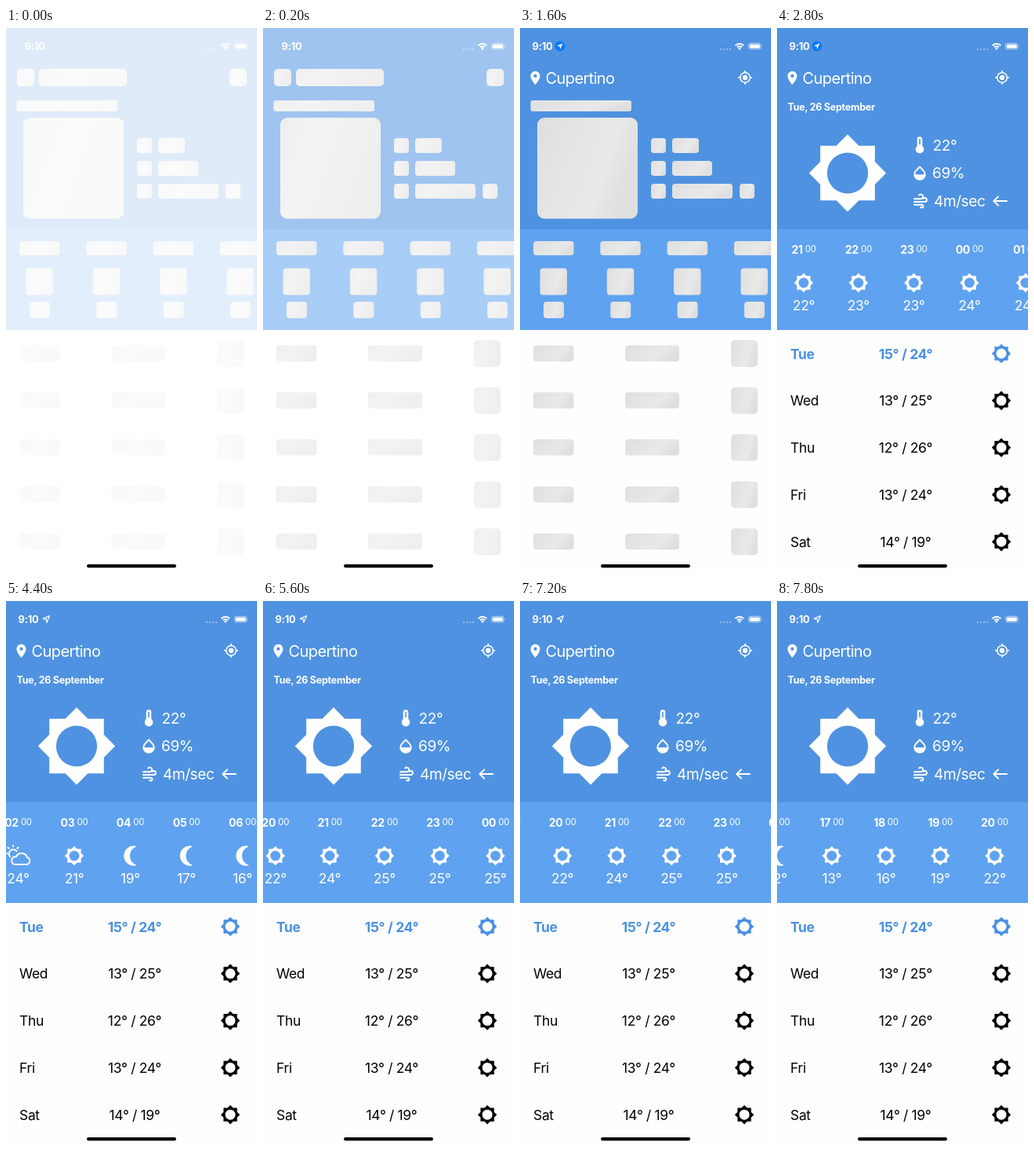
These frames come from a looping animation (320x693 px, 8000 ms). An HTML page:

```html
<!DOCTYPE html>
<html lang="en">
<head>
<meta charset="utf-8">
<title>Weather</title>
<style>
  html, body { margin: 0; width: 100%; height: 100%; overflow: hidden; background: #fff; }
  svg { display: block; width: 100%; height: 100%; }
  text { font-family: Inter, Roboto, sans-serif; letter-spacing: -.02em; white-space: pre; }
  .b { font-weight: 700; }
  .m { text-anchor: middle; }
  .line { fill: none; stroke: #fff; stroke-width: 2; stroke-linecap: round; stroke-linejoin: round; }
</style>
</head>
<body>
<svg viewBox="0 0 320 693" preserveAspectRatio="none">
  <defs>
    <linearGradient id="shine" x1="0" y1="0" x2="1" y2=".35">
      <stop offset="0" stop-color="#dfdfdf"/>
      <stop id="glow" offset=".5" stop-color="#e9e9e9"/>
      <stop offset="1" stop-color="#dfdfdf"/>
    </linearGradient>
    <path id="sun" fill-rule="evenodd" d="M8-3.31V-8H3.31L0-11.31-3.31-8H-8v4.69L-11.31 0-8 3.31V8h4.69L0 11.31 3.31 8H8V3.31L11.31 0zM0 6A6 6 0 1 1 0-6A6 6 0 1 1 0 6z"/>
    <path id="moon" transform="scale(1.27)" d="M-6.5 0A10 10 0 0 0 6.5 9.54A10 10 0 0 1-.5 0A10 10 0 0 1 6.5-9.54A10 10 0 0 0-6.5 0z"/>
    <path id="cloud" class="line" d="M-5 11H10.500A4.600 4.600 0 0 0 11.500 2A7.500 7.500 0 0 0-2.500 1A5.200 5.200 0 0 0-5 11z"/>
    <g id="cloudSun">
      <path class="line" d="M-10.500 1A5 5 0 1 1-2-6"/>
      <path class="line" d="M-6.500-12v-1M-12-9.500l-1-1M-14-3h-1M-1-9.500l1-1"/>
      <use href="#cloud"/>
    </g>
    <g id="cloudMoon">
      <path d="M-9-13A9 9 0 0 0-12.500 3Q-11 0-7-1Q-5-4-1.500-5Q-10-5-9-13z"/>
      <use href="#cloud"/>
    </g>
  </defs>

  <rect width="320" height="693" fill="#fefefe"/>
  <rect width="320" height="256" fill="#4f92e1"/>
  <rect y="256" width="320" height="128" fill="#5fa2f0"/>

  <g fill="#fff">
    <text id="clock" class="b" y="28" font-size="13">9:10</text>
    <g id="locating">
      <circle cx="51" cy="23" r="6.500" fill="#087bf5"/>
      <path d="M54.500 19.500L47 22.800l3.700.6.500 3.600z"/>
    </g>
    <path id="located" class="line" style="stroke-width:1.200" d="M55.500 18.800L47.200 22.600l4.200.5.500 4.400z"/>
    <g opacity=".5">
      <circle cx="256" cy="27" r="1"/><circle cx="260" cy="27" r="1"/>
      <circle cx="264" cy="27" r="1"/><circle cx="268" cy="27" r="1"/>
    </g>
    <g class="line" style="stroke-linecap:butt">
      <path d="M274.500 22.300a7.300 7.300 0 0 1 10.800 0M276.900 24.500a4.200 4.200 0 0 1 6 0"/>
    </g>
    <path d="M279.900 28l-2-2.100a2.800 2.800 0 0 1 4 0z"/>
    <rect x="291.500" y="19.500" width="15.500" height="7.500" rx="2.300" fill="none" stroke="#fff" stroke-opacity=".55"/>
    <rect x="292.700" y="20.700" width="13.100" height="5.100" rx="1.300"/>
    <path d="M308.200 21.800q1.500 1.400 0 2.900z" opacity=".6"/>
  </g>

  <g id="title" fill="#fff">
    <path transform="translate(19.500 63.500) scale(.86)" fill-rule="evenodd" d="M0-10C-3.870-10-7-6.870-7-3C-7 2.250 0 10 0 10S7 2.250 7-3C7-6.870 3.870-10 0-10zM0-.5A2.500 2.500 0 1 1 0-5.500A2.500 2.500 0 1 1 0-.5z"/>
    <text x="32.500" y="70.500" font-size="20" style="letter-spacing:-.03em">Cupertino</text>
    <circle cx="287" cy="63" r="3.200"/>
    <circle class="line" cx="287" cy="63" r="6.300" style="stroke-width:1.600"/>
    <path class="line" style="stroke-width:1.600;stroke-linecap:butt" d="M287 54v3M287 69v3M278 63h3M293 63h3"/>
  </g>
  <g id="titleBones" fill="url(#shine)"></g>
  <g id="bones" fill="url(#shine)"></g>

  <g id="content">
    <g fill="#fff">
      <text class="b" x="13.500" y="105" font-size="12.500">Tue, 26 September</text>
      <use href="#sun" transform="translate(90 184.500) scale(4.350)"/>
      <path d="M178.700 150V141.500a3.300 3.300 0 0 1 6.600 0V150a5.300 5.300 0 1 1-6.600 0z"/>
      <path d="M182 141.500v6" stroke="#4f92e1" stroke-width="1.600" stroke-linecap="round"/>
      <path class="line" d="M182 176.500l-4.700 4.900a6.700 6.700 0 1 0 9.400 0z"/>
      <path d="M175.500 186.200h13a6.500 6.500 0 0 1-13 0z"/>
      <path class="line" d="M175 217.200h8.300a2.800 2.800 0 1 0-2-4.700M175 221h13.500a2.500 2.500 0 1 0-1.800-4.300M175 224.700h9.500a1.900 1.900 0 1 1-1.400 3.200"/>
      <path class="line" d="M293 220h-16.500M282 214.500l-5.700 5.500 5.700 5.500"/>
      <g font-size="19">
        <text x="198.500" y="156">22°</text>
        <text x="198" y="191">69%</text>
        <text x="200" y="227">4m/sec</text>
      </g>
      <g id="strip"></g>
    </g>
    <g id="days" font-size="17.500"></g>
  </g>

  <rect id="veil" width="320" height="693" fill="#fff"/>
  <rect x="103" y="682" width="114" height="4.200" rx="2.100"/>
</svg>

<script>
const LOOP = 8000, STEP = 200;
const $ = id => document.getElementById(id);
const show = (id, on) => $(id).style.display = on ? '' : 'none';
const bone = (x, y, w, h, r = 4) =>
  `<rect x="${x}" y="${y}" width="${w}" height="${h}" rx="${r}"/>`;
const range = n => [...Array(n).keys()];

// Loading placeholders
$('titleBones').innerHTML =
  bone(14, 52, 22, 22, 5) + bone(42, 52, 112, 22, 5) + bone(285, 52, 22, 22, 5);
$('bones').innerHTML = bone(13.5, 92, 128.5, 14, 3) + bone(22, 114, 128, 128.5, 9)
  + [34, 51, 77].map((w, i) => bone(167, 140 + 29 * i, 19, 19) + bone(194, 140 + 29 * i, w, 19)).join('')
  + bone(280, 198, 19, 19)
  + range(4).map(i => 85.3 * i).map(x =>
      bone(17 + x, 271, 51.5, 18) + bone(25.5 + x, 305.5, 34.5, 34) + bone(30 + x, 348, 26, 21)).join('')
  + range(5).map(i => 59.8 * i).map(y =>
      bone(17, 403.5 + y, 51.5, 20.5) + bone(134, 403.5 + y, 69, 20.5) + bone(269, 397 + y, 34, 34, 5)).join('');

// Hourly forecast, starting at 21:00
const temps = [22, 23, 23, 24, 24, 24, 21, 19, 17, 16, 15, 14, 14, 13, 13, 13,
  12, 12, 12, 12, 13, 16, 19, 22, 24, 25, 25, 25, 25, 24, 22, 20, 18, 17, 15,
  14, 14, 13, 13, 13, 12, 12, 12, 12, 13, 16, 19, 22];
const hourAt = i => (21 + i) % 24;
const cellWidth = h => h < 10 ? 71.5 : h < 22 ? 69.2 : 70.5;
const centers = [34];
for (let i = 1; i < temps.length; i++)
  centers[i] = centers[i - 1] + (cellWidth(hourAt(i - 1)) + cellWidth(hourAt(i))) / 2;

function iconAt(i) {
  const h = hourAt(i);
  if (i === 5) return 'cloudSun';
  if (i > 35 && h >= 9 && h <= 12) return 'cloudMoon';
  return h > 3 && h < 17 ? 'moon' : 'sun';
}

$('strip').innerHTML = temps.map((temp, i) => {
  const icon = iconAt(i), scale = icon === 'sun' ? 1.08 : 1;
  return `<g transform="translate(${centers[i]} 0)">
    <text class="m" y="287" font-size="14"><tspan class="b">${String(hourAt(i)).padStart(2, '0')}</tspan><tspan dx="3" dy="-2" font-size="11.5">00</tspan></text>
    <use href="#${icon}" transform="translate(0 324) scale(${scale})"/>
    <text class="m" y="359" font-size="17.5">${temp}°</text></g>`;
}).join('');

// Daily forecast
$('days').innerHTML = [['Tue', 15, 24], ['Wed', 13, 25], ['Thu', 12, 26], ['Fri', 13, 24], ['Sat', 14, 19]]
  .map(([day, low, high], i) =>
    `<g transform="translate(0 ${59.8 * i})" ${i ? '' : 'class="b" fill="#4a90e2"'}>
    <text x="17" y="420.5">${day}</text>
    <text class="m" x="164" y="420.5">${low}° / ${high}°</text>
    <use href="#sun" transform="translate(286 414) scale(1.08)"/></g>`).join('');

// Each swipe ends with the given hour cell centred at x
const swipes = [[2800, 0, 34], [4400, 6, 87], [5600, 24, 85], [6400, 34, 35], [7800, 21, 139]]
  .map(([time, cell, x]) => [time, centers[cell] - x]);

function scrollAt(t) {
  const next = swipes.findIndex(([time]) => t < time);
  if (next === 0) return 0;
  if (next < 0) return swipes[swipes.length - 1][1];
  const [t0, from] = swipes[next - 1], [t1, to] = swipes[next];
  return from + (to - from) * Math.sin((t - t0) / (t1 - t0) * Math.PI / 2);
}

function draw(t) {
  const loaded = t >= 1800, titled = t >= 800, active = t >= 600;
  $('veil').setAttribute('opacity', Math.max(0, .82 - t / 550));
  $('clock').setAttribute('x', active ? 15.5 : 23.5);
  $('glow').setAttribute('offset', .5 + .25 * Math.sin((t - 1000) / 320));
  $('strip').setAttribute('transform', `translate(${-scrollAt(t)} 0)`);
  show('locating', active && t < 4200);
  show('located', t >= 4200);
  show('title', titled);
  show('titleBones', !titled);
  show('bones', !loaded);
  show('content', loaded);
}

const start = performance.now();
function tick() {
  const t = (performance.now() - start) % LOOP;
  draw(Math.floor(t / STEP) * STEP);
  requestAnimationFrame(tick);
}
tick();
</script>
</body>
</html>
```
